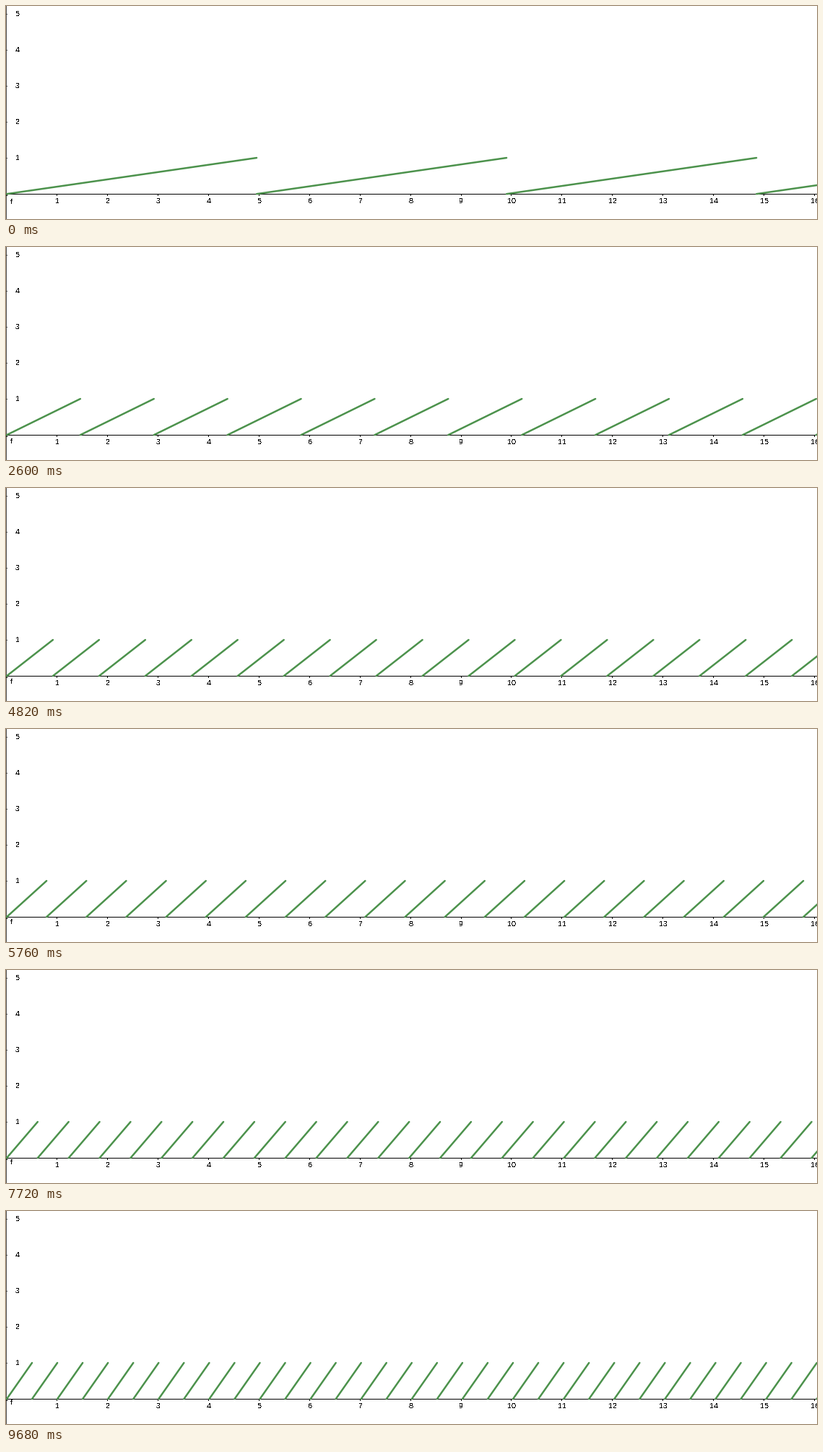
A matplotlib script for the animation above (9.76 s loop, 1123x296 px).

```python
import numpy as np
import matplotlib.pyplot as plt
from matplotlib.animation import FuncAnimation
from matplotlib.patches import Rectangle

W, H, DPI = 1123, 296, 64
PX = 72 / DPI                      # points per pixel
UNIT_X, UNIT_Y = 69.9, 50
AXIS_Y = 261
LOOP, TICK, STEPS = 9760, 20, 124  # ms, ms, poses per loop
GRAY = "#4a4a4a"

plt.rcParams.update({
    "font.family": "Liberation Sans",
    "text.hinting": "native",
    "text.hinting_factor": 1,
})

fig = plt.figure(figsize=(W / DPI, H / DPI), dpi=DPI, facecolor="white")
ax = fig.add_axes([0, 0, 1, 1])
ax.set_xlim(0, W)
ax.set_ylim(H, 0)
ax.axis("off")


def box(x, y, w, h, color="black"):
    ax.add_patch(Rectangle((x, y), w, h, fc=color, lw=0, antialiased=False, zorder=1))


def label(x, y, text):
    return ax.text(x, y, text, fontsize=10 * PX, color="black",
                   va="baseline", ha="left", antialiased=False, zorder=4)


def draw_axes():
    box(0, 0, 1, H, GRAY)
    box(0, AXIS_Y, W, 1)
    box(1, AXIS_Y + 1, 1, 2)
    for n in range(1, 17):
        x = round(0.4 + UNIT_X * n)
        box(x, AXIS_Y + 1, 1, 2)
        label(x - (2 if n < 10 else 5), 274, str(n))
    for n in range(1, 6):
        y = AXIS_Y - UNIT_Y * n
        box(1, y, 1, 1, GRAY)
        label(13, y + 3, str(n))


def frequency(step):
    """Teeth per unit: a steady rise, slightly quicker at the start."""
    return np.interp(step, [0, 18, STEPS - 1], [0.202, 0.468, 1.994])


draw_axes()
saw, = ax.plot([], [], color="#4c924c", lw=2.5 * PX, solid_capstyle="round", zorder=2)
name = label(6, 275, "f")


def update(i):
    step = min(int((i + 1) * TICK * STEPS / LOOP), STEPS - 1)
    period = UNIT_X / frequency(step)
    left = 1 + period * np.arange(int(W / period) + 1)
    gap = np.full_like(left, np.nan)
    base = np.full_like(left, AXIS_Y + 0.2)
    top = np.full_like(left, AXIS_Y - UNIT_Y)
    saw.set_data(np.column_stack([left, left + period, gap]).ravel(),
                 np.column_stack([base, top, gap]).ravel())
    name.set_y(275 - (step + 12) // 21)   # the name rides on the first tooth
    return saw, name


anim = FuncAnimation(fig, update, frames=LOOP // TICK, interval=TICK,
                     repeat=True, repeat_delay=0, blit=False)
plt.show()
```
